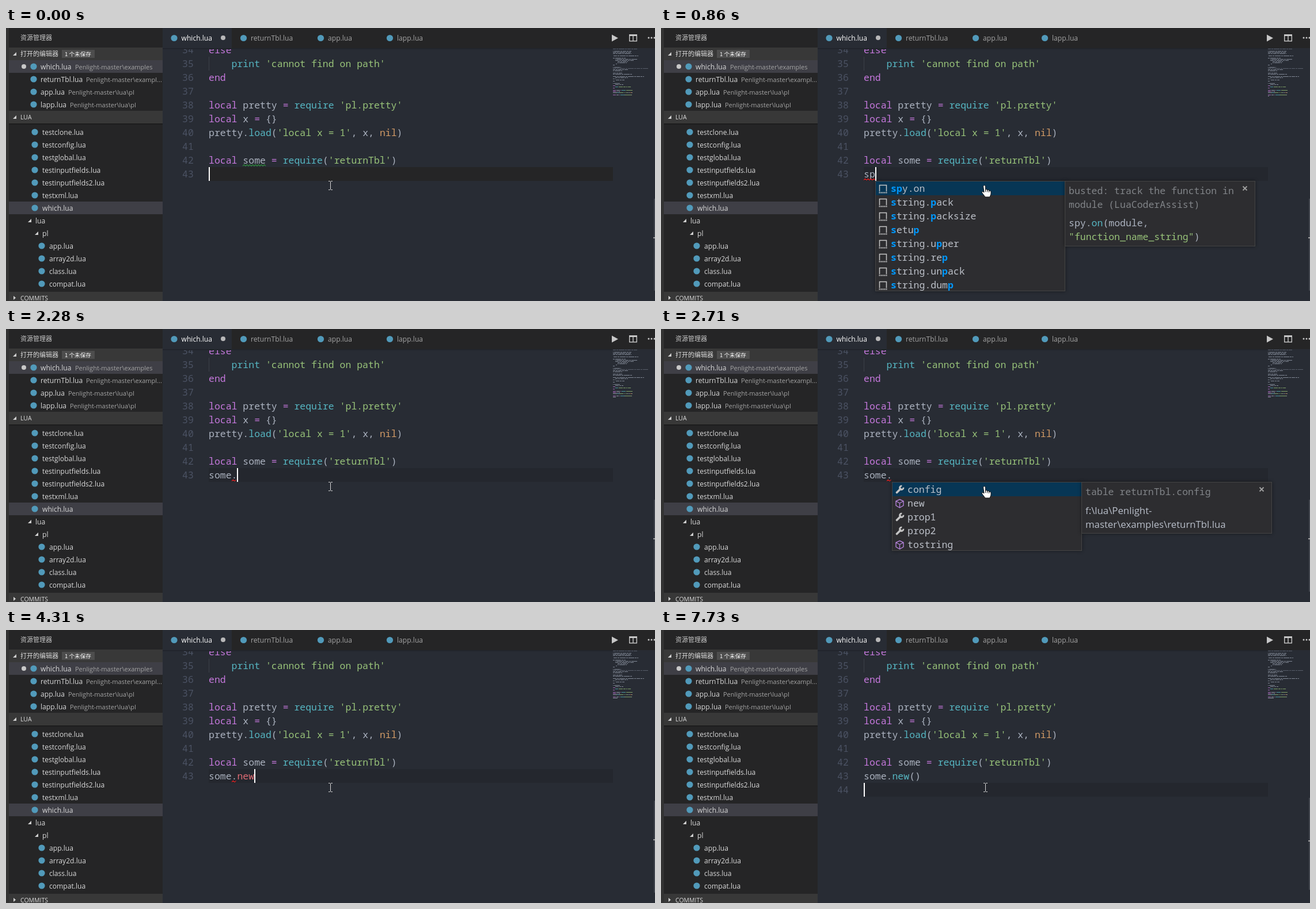
An HTML page with a canvas for the animation above (8 s loop, 1127x475 px).

```html
<!DOCTYPE html>
<html lang="zh">
<head>
<meta charset="utf-8">
<style>
  html, body { margin: 0; width: 100%; height: 100%; overflow: hidden; background: #282c34; }
  canvas { display: block; }
</style>
</head>
<body>
<canvas id="stage" width="1127" height="475"></canvas>
<script>
const ctx = document.getElementById('stage').getContext('2d');
const LOOP = 8000, CH = 9.896, LEFT = 352, LINE = 24;
const MONO = '"Noto Sans Mono", "DejaVu Sans Mono", monospace';
const UI = '"Open Sans", "Noto Sans CJK SC", "Noto Sans CJK", sans-serif';
const CJK = '"Noto Sans CJK SC", "Noto Sans CJK", sans-serif';
const INK = { k: '#c678dd', d: '#abb2bf', c: '#56b6c2', s: '#98c379', n: '#d19a66', r: '#e06c75' };
const LABEL = '#dadada', DIM = '#a4a4a4';

// Each token starts with its colour key.
const CODE = [
  ['kelse'],
  ['d    ', 'cprint', 'd ', "s'cannot find on path'"],
  ['kend'],
  [],
  ['klocal', 'd pretty ', 'k=', 'd ', 'crequire', 'd ', "s'pl.pretty'"],
  ['klocal', 'd x ', 'k=', 'd {}'],
  ['dpretty.', 'cload', 'd(', "s'local x = 1'", 'd, x, ', 'nnil', 'd)'],
  [],
  ['klocal', 'd some ', 'k=', 'd ', 'crequire', 'd(', "s'returnTbl'", 'd)']
];
// Indent and length of the lines above, for the minimap.
const ABOVE = [0,44, 0,42, 0,0, 0,32, 0,31, 0,32, 0,0, 0,44, 0,0, 0,22, 4,38, 4,32, 8,18, 8,16,
  4,3, 0,3, 0,0, 0,14, 0,61, 0,26, 0,16, 0,0, 0,16, 0,34, 0,0, 0,54, 4,22, 0,4, 4,16, 0,3,
  0,0, 0,12, 4,14];

const pathDoc = (title, file) => ({ title: [title], path: ['f:\\lua\\Penlight-', 'master\\examples\\' + file], h: 90 });
const SPY_DOC = {
  title: ['busted: track the function in', 'module (LuaCoderAssist)'],
  code: [['dspy.', 'con', 'd(module,'], ['s"function_name_string"', 'd)']], h: 114
};
const SP_LIST = ['spy.on', 'string.pack', 'string.packsize', 'setup', 'string.upper', 'string.rep', 'string.unpack', 'string.dump'];
const S_LIST = ['select', 'setmetatable', 'string', 'spy', 'stub', 'setup', 'spy.on', 'string.byte', 'string.char', 'string.dump'];
const MEMBERS = ['config', 'new', 'prop1', 'prop2', 'tostring'];
const SOME_DOC = pathDoc('local some', 'which.lua');

// Each step changes part of the state before it.
const STEPS = [
  [0, { text: '', col: 0, caret: 1, unused: 1 }],
  [430, { text: 's', col: 1 }],
  [570, { list: S_LIST, match: 's', wave: [0, 1] }],
  [720, { text: 'sp', col: 2, list: SP_LIST, match: 'sp', unused: 0 }],
  [860, { doc: SPY_DOC, wave: [0, 2] }],
  [1140, { text: 's', col: 1, list: 0, doc: 0, wave: [0, 1] }],
  [1290, { text: 'so', col: 2, list: ['some'], match: 'so', doc: SOME_DOC, wave: [0, 2] }],
  [1560, { text: 'som', col: 3, match: 'som' }],
  [1700, { wave: [0, 3] }],
  [1980, { text: 'some', col: 4, match: 'some' }],
  [2130, { text: 'some.', col: 5, list: 0, doc: 0 }],
  [2280, { wave: [4, 5] }],
  [2430, { list: MEMBERS, match: '', pick: 0, doc: pathDoc('table returnTbl.config', 'returnTbl.lua') }],
  [2710, { caret: 0 }],
  [3290, { caret: 1, pick: 1, doc: pathDoc('function returnTbl.new()', 'returnTbl.lua') }],
  [3750, { caret: 0 }],
  [4310, { caret: 1, text: 'some.new', col: 8, list: 0, doc: 0 }],
  [4470, { wave: [5, 8] }],
  [4740, { caret: 0 }],
  [5050, { caret: 1, col: 9 }],
  [5510, { caret: 0 }],
  [5630, { caret: 1, col: 8 }],
  [5940, { text: 'some.new()', col: 9 }],
  [6070, { wave: 0, boxes: 1 }],
  [6350, { hint: 1 }],
  [6600, { caret: 0 }],
  [7030, { caret: 1, col: 10 }],
  [7220, { hint: 0 }],
  [7420, { caret: 0 }],
  [7730, { caret: 1, col: 0, boxes: 0, below: 1 }]
];

const colX = col => Math.round(LEFT + col * CH);

function rect(x, y, w, h, fill) {
  ctx.fillStyle = fill;
  ctx.fillRect(x, y, w, h);
}
function frame(x, y, w, h, stroke) {
  ctx.strokeStyle = stroke;
  ctx.lineWidth = 1;
  ctx.strokeRect(x + .5, y + .5, w - 1, h - 1);
}
function poly(points, fill) {
  ctx.fillStyle = fill;
  ctx.beginPath();
  for (let i = 0; i < points.length; i += 2) ctx.lineTo(points[i], points[i + 1]);
  ctx.fill();
}
function disc(x, y, r, fill) {
  ctx.fillStyle = fill;
  ctx.beginPath();
  ctx.arc(x, y, r, 0, 7);
  ctx.fill();
}
function text(str, x, y, fill, size = 12.1, family = UI, weight = '') {
  ctx.font = `${weight} ${size}px ${family}`;
  ctx.fillStyle = fill;
  ctx.fillText(str, x, y);
}
const mono = (str, x, y, fill, weight) => text(str, x, y, fill, CH / .6, MONO, weight);
function tokens(list, x, y) {
  for (const t of list) {
    mono(t.slice(1), x, y, INK[t[0]]);
    x += (t.length - 1) * CH;
  }
}
function wave(from, to, y, stroke) {
  ctx.strokeStyle = stroke;
  ctx.lineWidth = 1.1;
  ctx.beginPath();
  for (let x = from, i = 0; x <= to; x += 2.5, i++) ctx.lineTo(x, y + (i % 2 ? -1.2 : 1.2));
  ctx.stroke();
}
const fileIcon = (x, y) => disc(x, y, 5.6, '#519aba');
const openArrow = (x, y) => poly([x + 3, y - 3, x + 3, y + 3, x - 3, y + 3], '#d0d0d0');

function sidebar() {
  rect(0, 0, 272, 475, '#252526');
  rect(0, 0, 5, 475, '#333333');
  text('资源管理器', 25, 21, '#c8c8c8', 11, CJK);
  for (const [y, h] of [[34, 22], [144, 22], [459, 16]]) rect(5, y, 267, h, '#383838');
  rect(5, 166, 267, 2, '#1c1c1d');
  rect(5, 56, 267, 22, '#3f3f46');
  rect(5, 302, 267, 22, '#3f3f46');

  openArrow(15, 45);
  text('打开的编辑器', 25, 49, LABEL, 11, CJK);
  rect(97, 38, 57, 14, '#4d4d4d');
  text('1 个未保存', 102, 49, '#ffffff', 9.6, CJK);
  openArrow(15, 155);
  text('LUA', 25, 159, LABEL, 10.5);
  poly([13, 466, 17, 469.5, 13, 473], '#d0d0d0');
  text('COMMITS', 25, 474, LABEL, 10.5);

  disc(31, 67, 4, '#c8c8c8');
  [['which', 120, 'examples'], ['returnTbl', 139, 'exampl...'], ['app', 108, 'lua\\pl'], ['lapp', 111, 'lua\\pl']]
    .forEach(([name, x, dir], i) => {
      const y = 67 + i * 22;
      fileIcon(48, y);
      text(name + '.lua', 60, y + 5, LABEL);
      text('Penlight-master\\' + dir, x, y + 5, DIM, 11);
    });
  ['testclone', 'testconfig', 'testglobal', 'testinputfields', 'testinputfields2', 'testxml', 'which',
    '/lua', '/pl', 'app', 'array2d', 'class', 'compat'].forEach((name, i) => {
    const y = 181 + i * 22, x = i < 7 ? 63 : i < 9 ? 51 + (i - 7) * 12 : 75;
    if (name[0] === '/') {
      openArrow(x - 10, y);
      text(name.slice(1), x, y + 5, LABEL);
    } else {
      fileIcon(x - 13, y);
      text(name + '.lua', x, y + 5, LABEL);
    }
  });
}

function tabs() {
  rect(272, 0, 855, 35, '#252526');
  rect(272, 0, 120, 35, '#282c34');
  [['which', 292], ['returnTbl', 412.5], ['app', 546.5], ['lapp', 666.5]].forEach(([name, x], i) => {
    fileIcon(x, 17.5);
    text(name + '.lua', x + 12.5, 22, i ? DIM : '#ffffff');
  });
  disc(377, 17, 4, '#b8b8b9');
  poly([1052, 11.5, 1063, 17.5, 1052, 23.5], '#c8c8c8');
  ctx.strokeStyle = '#c8c8c8';
  ctx.lineWidth = 1.4;
  ctx.strokeRect(1082.7, 11.7, 12.6, 11);
  ctx.strokeRect(1089, 12, 0, 11);
  rect(1082, 11, 14, 3, '#c8c8c8');
  for (let x = 1116; x < 1128; x += 5) disc(x, 17, 1.5, '#c8c8c8');
}

function minimap(typed) {
  const row = n => 34 + n * 2;
  for (let n = 0; n < ABOVE.length / 2; n++) {
    const [indent, len] = ABOVE.slice(n * 2, n * 2 + 2);
    for (let i = 0; i < len; i++)
      if ((i * 5 + n * 3 + (i >> 3)) % 7) rect(1054 + indent + i, row(n), 1, 1, n < 2 || n === 18 ? '#565c68' : '#7f8693');
  }
  ctx.globalAlpha = .75;
  [...CODE, ['d' + typed]].forEach((line, n) => {
    let x = 1054;
    for (const t of line) for (const c of t.slice(1)) {
      if (c !== ' ') rect(x, row(n + 33), 1, 1, INK[t[0]]);
      x++;
    }
  });
  ctx.globalAlpha = 1;
}

function editor(s) {
  ctx.save();
  ctx.beginPath();
  ctx.rect(272, 35, 855, 440);
  ctx.clip();
  const top = 242 + s.below * LINE;
  rect(LEFT, top, 702, LINE, s.text ? '#24272e' : '#252526');
  rect(LEFT, 50, 1, LINE, '#3b4048');
  CODE.forEach((line, i) => tokens(line, LEFT, 44 + i * LINE));
  for (let n = 34; n < 44 + s.below; n++) mono(n, 306, 44 + (n - 34) * LINE, '#4b5263');

  const call = s.text.endsWith(')');
  tokens(['d' + s.text.slice(0, 5), (call ? 'c' : 'r') + s.text.slice(5, 8), 'd' + s.text.slice(8)], LEFT, 260);
  if (s.unused) wave(411, 451, 239, '#2f8f3c');
  if (s.wave) wave(colX(s.wave[0]), colX(s.wave[1]), 263.5, '#e02020');
  if (s.boxes) for (const col of [8, 9]) frame(colX(col), 242, 10, LINE, '#7d8580');
  if (s.caret) rect(colX(s.col), top, 2, LINE, '#ffffff');

  minimap(s.text);
  rect(1125, 297 - s.below * 5, 2, 160, '#41454d');
  rect(1124, 364 + s.below * 2, 3, 2, '#a0a0a0');
  ctx.restore();
  rect(272, 35, 782, 2, '#22252c');
  if (s.hint) {
    panel(441, 207, 163, 34);
    mono('returnTbl.new()', 448, 230, INK.d);
  }
}

function panel(x, y, w, h) {
  ctx.save();
  ctx.shadowColor = 'rgba(0,0,0,.45)';
  ctx.shadowBlur = 6;
  rect(x, y, w, h, '#2d2d30');
  ctx.restore();
  frame(x, y, w, h, '#454545');
}

function snippetIcon(x, y) {
  ctx.strokeStyle = '#c5c5c5';
  ctx.lineWidth = 1.5;
  ctx.beginPath();
  ctx.moveTo(x - 6, y + 5);
  ctx.lineTo(x - 6, y - 6);
  ctx.lineTo(x + 6, y - 6);
  ctx.lineTo(x + 6, y + 5);
  ctx.stroke();
  for (let i = -7; i < 8; i += 3) rect(x + i, y + 6, 2, 2, '#c5c5c5');
}
function wrenchIcon(x, y) {
  ctx.strokeStyle = '#c5c5c5';
  ctx.lineCap = 'round';
  ctx.lineWidth = 3.6;
  ctx.beginPath();
  ctx.moveTo(x - 5, y + 5);
  ctx.lineTo(x + 1.5, y - 1.5);
  ctx.stroke();
  ctx.lineCap = 'butt';
  ctx.lineWidth = 2.8;
  ctx.beginPath();
  ctx.arc(x + 3.2, y - 3.2, 3.2, -.2, 4.9);
  ctx.stroke();
}
function cubeIcon(x, y) {
  ctx.strokeStyle = '#b180d7';
  ctx.lineWidth = 1.4;
  ctx.stroke(new Path2D(`M${x} ${y - 7}l6.5 3v7.5l-6.5 4l-6.5-4v-7.5zM${x - 6.5} ${y - 4}l6.5 3.5l6.5-3.5M${x} ${y - .5}v8`));
}

function popup(s) {
  const x = colX(s.col), pick = s.pick || 0;
  panel(x, 266, 330, s.list.length * LINE);
  s.list.forEach((item, i) => {
    const y = 267 + i * LINE;
    if (i === pick) rect(x + 1, y, 328, Math.min(LINE, 265 + s.list.length * LINE - y), '#073655');
    const icon = s.list !== MEMBERS ? snippetIcon : /new|tos/.test(item) ? cubeIcon : wrenchIcon;
    icon(x + 13.5, y + 12.5);
    let hit = 0;
    [...item].forEach((c, j) => {
      const on = c === s.match[hit];
      if (on) hit++;
      mono(c, x + 27 + j * CH, y + 18, on ? '#0097fb' : '#bcc0c8', on ? 'bold' : '');
    });
  });
  if (!s.doc) return;
  const d = s.doc, tx = x + 336;
  panel(x + 329, 266, 331, d.h);
  d.title.forEach((t, i) => mono(t, tx, 289 + i * LINE, '#818488'));
  const y = 297 + d.title.length * LINE;
  (d.code || []).forEach((t, i) => tokens(t, tx, y + i * LINE));
  (d.path || []).forEach((t, i) => text(t, tx, y + 1 + i * LINE, '#b8bec9', 16.8));
  ctx.strokeStyle = '#a0a0a0';
  ctx.lineWidth = 1.8;
  ctx.stroke(new Path2D(`M${x + 638.5} 275.5l7 7m0-7l-7 7`));
}

function pointer(hand) {
  ctx.lineWidth = 1;
  if (!hand) {
    ctx.strokeStyle = '#d8d8d8';
    ctx.stroke(new Path2D('M560 266.5h2.5l1 1l1-1h2.5M563.5 267v14M560 281.5h2.5l1-1l1 1h2.5'));
    return;
  }
  const p = new Path2D('M562.5 275q2-3 4 0v6q3-1 3.5 1q2.5-1 3 1q2.5-.5 3 2v4l-2 5h-8l-6-8q0-3 4 0z');
  ctx.save();
  ctx.translate(-3, 0);
  ctx.fillStyle = '#ffffff';
  ctx.fill(p);
  ctx.strokeStyle = '#111111';
  ctx.stroke(p);
  ctx.stroke(new Path2D('M566.5 281v4M569.5 282v3.5M572.5 283v3'));
  ctx.restore();
}

function draw(now) {
  const t = now % LOOP, s = { below: 0 };
  for (const [at, change] of STEPS) if (at <= t) Object.assign(s, change);
  rect(0, 0, 1127, 475, '#282c34');
  sidebar();
  tabs();
  editor(s);
  if (s.list) popup(s);
  pointer(s.list && s.list.length > 1);
  requestAnimationFrame(draw);
}
draw(0);
</script>
</body>
</html>
```
